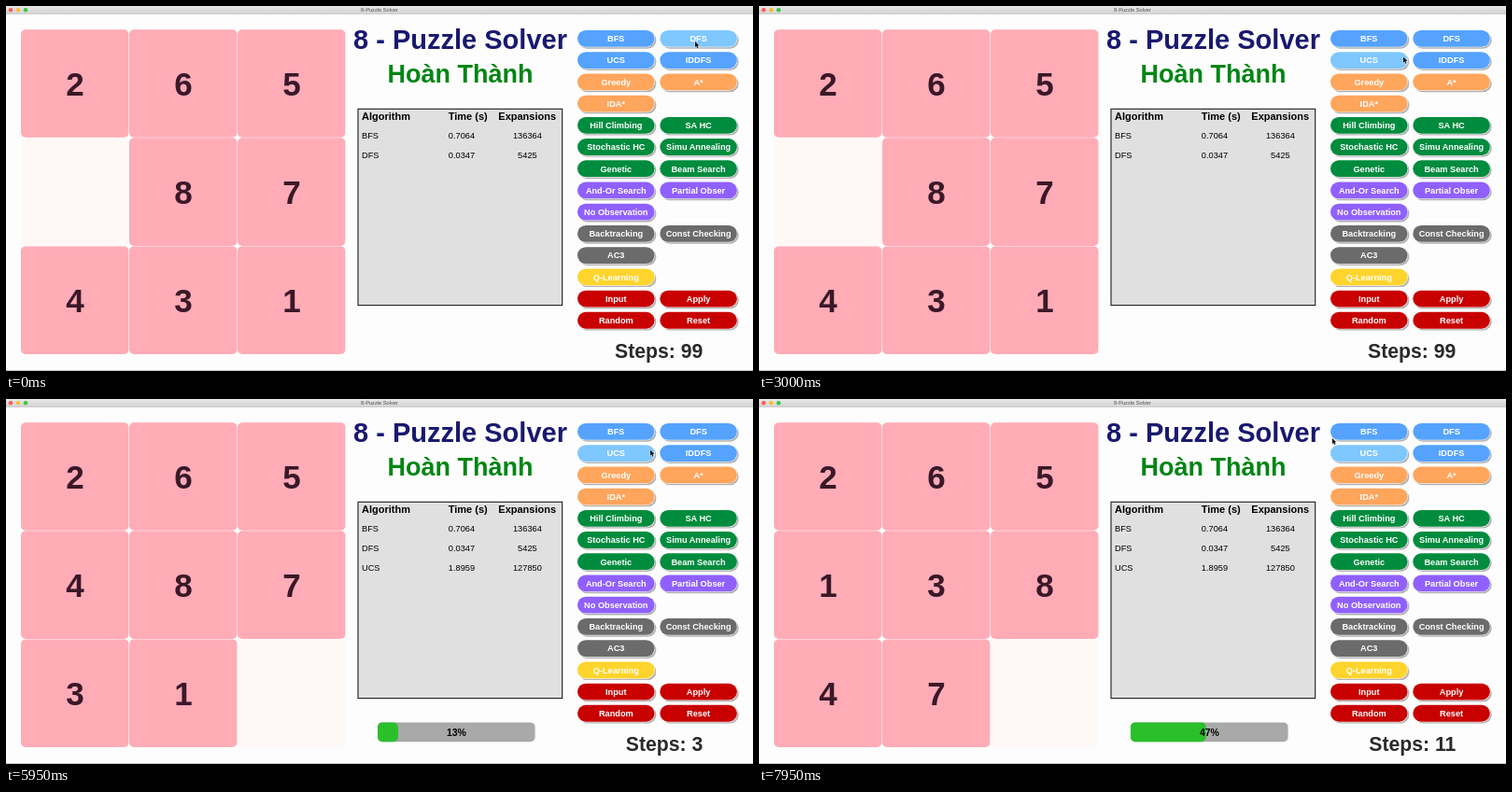
Write an HTML page that moves like this. It is 800 px wide and 391 px high and loops after 8 s.

```html
<!DOCTYPE html>
<html lang="vi">
<head>
<meta charset="utf-8">
<title>8-Puzzle Solver</title>
<style>
  html, body { margin: 0; width: 100%; height: 100%; overflow: hidden; background: #fdfdfd; }
  svg { display: block; width: 800px; height: 391px; font-family: "Liberation Sans", Arial, sans-serif; }
</style>
</head>
<body>
<svg id="stage" viewBox="0 0 800 391"></svg>
<script>
const LOOP = 8000;
const stage = document.getElementById("stage");

function add(tag, attrs, parent = stage) {
  const el = document.createElementNS("http://www.w3.org/2000/svg", tag);
  for (const key in attrs) el.setAttribute(key, attrs[key]);
  return parent.appendChild(el);
}
function box(x, y, width, height, rx, fill, more, parent) {
  return add("rect", { x, y, width, height, rx, fill, ...more }, parent);
}
function label(str, x, y, size, fill, anchor = "middle", weight = "bold", parent) {
  const el = add("text", { x, y, fill, "font-size": size, "font-weight": weight, "text-anchor": anchor }, parent);
  el.textContent = str;
  return el;
}
function show(el, on) {
  el.setAttribute("visibility", on ? "visible" : "hidden");
}

// Window frame
const grad = add("linearGradient", { id: "bar", x2: 0, y2: 1 }, add("defs", {}));
add("stop", { offset: 0, "stop-color": "#e9e9e9" }, grad);
add("stop", { offset: 1, "stop-color": "#d2d2d2" }, grad);
box(0, 0, 800, 391, 0, "#fdfdfd");
box(0, 0, 800, 8.5, 0, "url(#bar)");
box(0, 8, 800, .6, 0, "#bdbdbd");
box(0, 390, 800, 1, 0, "#c4c4c4");
["#f9605a", "#f8bd37", "#39c84a"].forEach((fill, i) =>
  add("circle", { cx: 5 + i * 8, cy: 4.2, r: 2.3, fill }));
label("8-Puzzle Solver", 400, 6.3, 5.7, "#505050", "middle", "normal");

// Headings
label("8 - Puzzle Solver", 486.5, 46.3, 29, "#191970");
label("Hoàn Thành", 486.5, 82, 27, "#008514");

// Results table
box(377, 110.3, 218.7, 210.3, 0, "#e0e0e0", { stroke: "#1c1c1c", "stroke-width": 1.1 });
label("Algorithm", 381, 122, 11, "#000", "start");
label("Time (s)", 473.7, 122, 11, "#000", "start");
label("Expansions", 558.2, 122, 11, "#000");
const rows = [["BFS", "0.7064", "136364"], ["DFS", "0.0347", "5425"], ["UCS", "1.8959", "127850"]]
  .map(([name, time, count], i) => {
    const g = add("g", {}), y = 141.7 + i * 21.1;
    label(name, 381, y, 9.25, "#000", "start", "normal", g);
    label(time, 473.8, y, 9.25, "#000", "start", "normal", g);
    label(count, 558.4, y, 9.25, "#000", "middle", "normal", g);
    return g;
  });

// Buttons
const BLUE = "#55a3ff", HOVER = "#7fc7ff", ORANGE = "#ffa55c", GREEN = "#008c3e",
      PURPLE = "#9060ff", GREY = "#6b6b6b", YELLOW = "#ffd42c", RED = "#c80000";
const buttons = {};
[
  [BLUE, "BFS", "DFS"], [BLUE, "UCS", "IDDFS"],
  [ORANGE, "Greedy", "A*"], [ORANGE, "IDA*"],
  [GREEN, "Hill Climbing", "SA HC"], [GREEN, "Stochastic HC", "Simu Annealing"], [GREEN, "Genetic", "Beam Search"],
  [PURPLE, "And-Or Search", "Partial Obser"], [PURPLE, "No Observation"],
  [GREY, "Backtracking", "Const Checking"], [GREY, "AC3"],
  [YELLOW, "Q-Learning"], [RED, "Input", "Apply"], [RED, "Random", "Reset"]
].forEach(([color, ...names], row) => names.forEach((name, col) => {
  const x = 612 + col * 88.3, y = 26 + row * 23.22;
  box(x + 1.2, y + 1.3, 83.2, 18.4, 9.2, "#b2b2b2");
  box(x - .7, y - .7, 83.8, 19, 9.5, "#fff");
  buttons[name] = box(x, y, 82.6, 17.8, 8.9, color);
  label(name, x + 41.3, y + 12.2, 9.2, "#fff");
}));

// Board
const cell = i => [16 + i % 3 * 116, 25.2 + Math.floor(i / 3) * 116.1];
const tiles = [];
const gap = box(0, 0, 115.4, 115.6, 5, "#fef8f7");
for (let n = 1; n <= 8; n++) {
  tiles[n] = add("g", {});
  box(0, 0, 115.4, 115.6, 5, "#ffacb7", {}, tiles[n]);
  label(n, 57.9, 70.7, 35, "#3a1828", "middle", "bold", tiles[n]);
}

// Board after every step; each digit of MOVES is where the gap goes
const MOVES = "67854763478";
const TOTAL = 23, FIRST = 5250, EVERY = 250, BAR_FROM = 5150;
const boards = [[2, 6, 5, 0, 8, 7, 4, 3, 1]];
for (const to of MOVES) {
  const next = [...boards[boards.length - 1]];
  next[next.indexOf(0)] = next[to];
  next[to] = 0;
  boards.push(next);
}

// Progress bar and step counter
const BAR_W = 168.6;
const progress = add("g", {});
box(398, 346.4, BAR_W, 20.8, 5, "#a9a9a9", {}, progress);
const fill = box(398, 346.4, 0, 20.8, 5, "#2bc02b", {}, progress);
const percent = label("0%", 482.4, 360.5, 10.5, "#000", "middle", "bold", progress);
const steps = label("", 746.3, 376.8, 21.2, "#2a2a2a", "end");

// Pointer: time, x, y
const PATH = [
  [0, 738, 38], [1750, 738, 38], [2150, 694, 61], [2400, 690, 54.5],
  [7700, 690, 54.5], [7950, 614, 42]
];
const HOVERS = [[0, "DFS"], [1870, "IDDFS"], [2060, "UCS"]];
const pointer = add("path", {
  d: "M0 0V6.2L1.4 5L2.4 7.2L3.4 6.8L2.5 4.6H4.4Z",
  fill: "#111", stroke: "#fff", "stroke-width": .7, "paint-order": "stroke"
});

function pointerAt(t) {
  const i = PATH.findIndex(p => p[0] > t);
  if (i < 0) return PATH[PATH.length - 1].slice(1);
  const [t0, x0, y0] = PATH[i - 1], [t1, x1, y1] = PATH[i];
  const k = (t - t0) / (t1 - t0);
  return [x0 + (x1 - x0) * k, y0 + (y1 - y0) * k];
}

function draw(t) {
  const done = t < FIRST ? 0 : Math.min(MOVES.length, 1 + Math.floor((t - FIRST) / EVERY));
  boards[done].forEach((n, i) =>
    (n ? tiles[n] : gap).setAttribute("transform", `translate(${cell(i)})`));

  show(rows[2], done > 0);
  show(progress, t >= BAR_FROM);
  fill.setAttribute("width", BAR_W * done / TOTAL);
  percent.textContent = Math.floor(100 * done / TOTAL) + "%";
  steps.textContent = "Steps: " + (done || 99);

  const hovered = HOVERS.filter(h => h[0] <= t).pop()[1];
  for (const [, name] of HOVERS) buttons[name].setAttribute("fill", name === hovered ? HOVER : BLUE);
  pointer.setAttribute("transform", `translate(${pointerAt(t)})`);
}

const start = performance.now();
function tick() {
  draw((performance.now() - start) % LOOP);
  requestAnimationFrame(tick);
}
tick();
</script>
</body>
</html>
```
